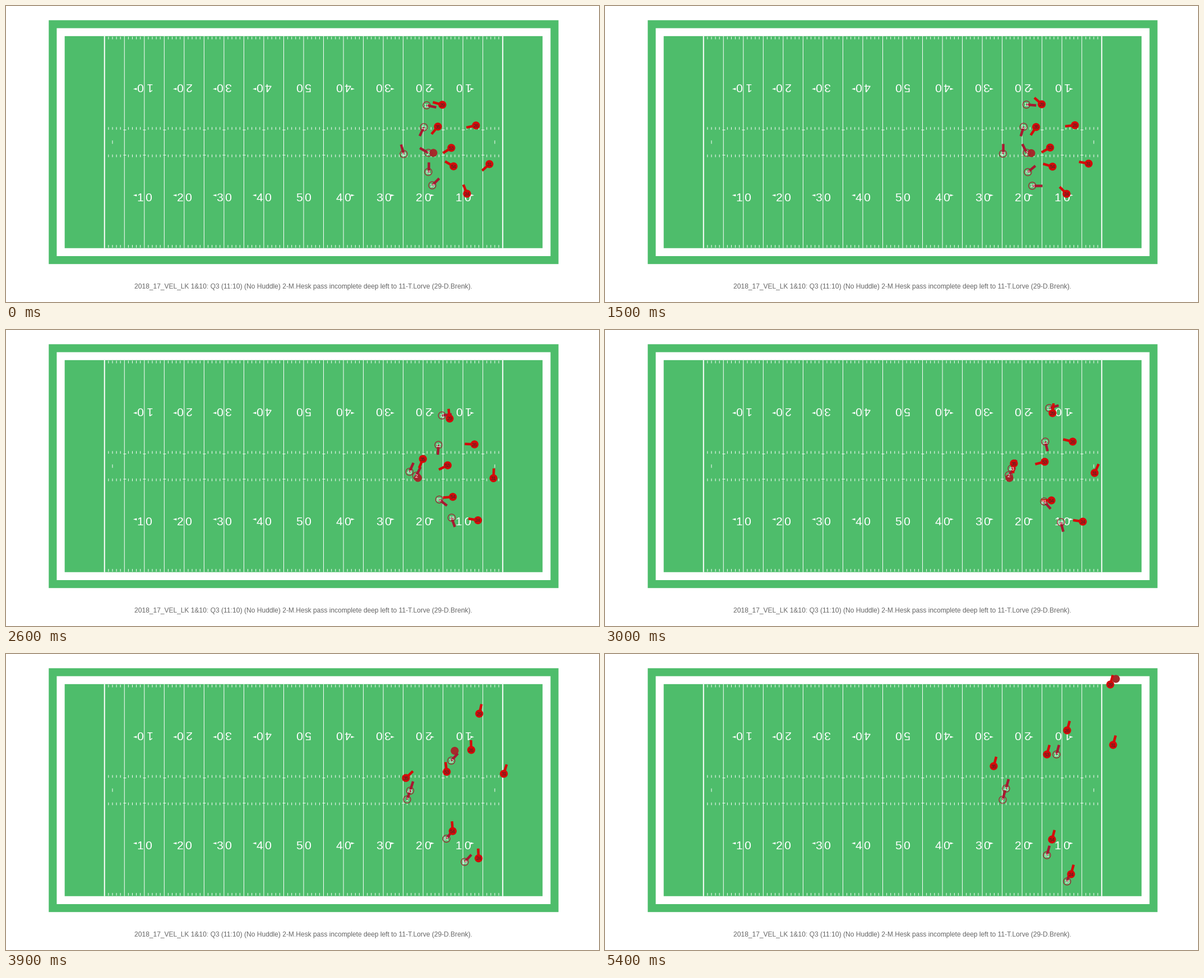
Recreate the animation shown at these times as a matplotlib script. Size 1058 by 529 pixels, loop 5500 ms.

```python
import numpy as np
import matplotlib.pyplot as plt
from matplotlib.animation import FuncAnimation
from matplotlib.patches import Circle, Polygon, Rectangle

W, H = 1058, 529
FRAMES, INTERVAL = 55, 100
SNAP, THROW, TURNED, LAST = 13, 30, 41, FRAMES - 1

YARD = 7.105
CX, CY = 530.5, 242.8
HALF_LENGTH, HALF_WIDTH = 60 * YARD, 26.667 * YARD
LEFT, TOP, BOTTOM = CX - 50 * YARD, CY - HALF_WIDTH, CY + HALF_WIDTH
TICK = 0.66 * YARD

GREEN, WHITE = "#4EBD6B", "#FFFFFF"
OFFENSE, DEFENSE = "#A71930", "#D50A0A"
BALL, INK, CAPTION = "#A52A2A", "#34302B", "#666666"
RADIUS, STICK, UPFIELD = 6.5, 17.5, 75

plt.rcParams["font.family"] = "Liberation Sans"
fig = plt.figure(figsize=(W / 72, H / 72), dpi=72, facecolor=WHITE)
ax = fig.add_axes([0, 0, 1, 1])
# Whole coordinates fall on pixel centres.
ax.set(xlim=(-0.5, W - 0.5), ylim=(H - 0.5, -0.5))
ax.axis("off")


def label(x, y, text, size, color, flip=1, **kw):
    """Text centred on x, with its digits centred on y."""
    return ax.text(x, y + flip * 0.353 * size, text, size=size, color=color,
                   ha="center", va="baseline", rotation=90 - 90 * flip,
                   rotation_mode="anchor", **kw)


def vertical(xs, y0, y1, width=1):
    ax.vlines(xs, y0, y1, color=WHITE, lw=width, zorder=2).set_snap(False)


def draw_number(x, value, side):
    for flip in (1, -1):
        y = CY + flip * 98
        for char, offset in zip(str(value), (-7.5, 7.5)):
            label(x + flip * offset, y, char, 21.3, WHITE, flip, zorder=2)
        if side:
            base, tip, ay = x + side * 13.5, x + side * 20, y - flip * 3
            ax.add_patch(Polygon([(base, ay - 2), (base, ay + 2), (tip, ay)],
                                 color=WHITE, lw=0, zorder=2))


def draw_field():
    for yards, color in ((4, GREEN), (2, WHITE), (0, GREEN)):
        w, h = HALF_LENGTH + yards * YARD, HALF_WIDTH + yards * YARD
        ax.add_patch(Rectangle((CX - w, CY - h), 2 * w, 2 * h, color=color,
                               lw=0, snap=False))

    yards = np.arange(1, 100)
    xs = LEFT + YARD * yards
    fives, singles = xs[yards % 5 == 0], xs[yards % 5 != 0]
    vertical(fives, TOP, BOTTOM)
    vertical([LEFT, LEFT + 100 * YARD], TOP, BOTTOM, 2)
    vertical([LEFT + 2 * YARD, LEFT + 98 * YARD], CY - 3, CY + 3)
    for side in (-1, 1):
        hash_y, edge = CY + side * 22.2, CY + side * (HALF_WIDTH - 1)
        vertical(singles, hash_y, hash_y + side * TICK)
        vertical(singles, edge, edge - side * TICK)
        ax.hlines([hash_y] * len(fives), fives - 2.5, fives + 2.5,
                  color=WHITE, lw=1, zorder=2)

    for mark in range(10, 100, 10):
        draw_number(LEFT + YARD * mark, min(mark, 100 - mark), np.sign(mark - 50))


def progress(t, start, end):
    return np.clip((t - start) / (end - start), 0, 1)


def slowing(u):
    return u * (1.3 - 0.3 * u)


class Player:
    """Runs from set to spot as the passer drops back, then on to finish."""

    def __init__(self, number, attacking, path, stance, dropback, last=LAST):
        self.set, self.spot, self.finish = np.array(path, float)
        self.headings = stance, dropback, UPFIELD
        self.last = last
        color, z = (OFFENSE, 4) if attacking else (DEFENSE, 5)
        self.stick, = ax.plot([], [], color=color, lw=4.5,
                              solid_capstyle="butt", zorder=z)
        self.dot = Circle((0, 0), RADIUS, ec=color, lw=1.2, zorder=z,
                          fc="none" if attacking else color)
        ax.add_patch(self.dot)
        self.text = label(0, 0, str(number), 9, WHITE if attacking else INK, zorder=6)

    def position(self, t):
        run = progress(t, SNAP, THROW) ** 1.6
        chase = slowing(progress(t, THROW, LAST))
        return (self.set + run * (self.spot - self.set)
                + chase * (self.finish - self.spot))

    def update(self, t):
        x, y = self.position(t)
        angle = np.radians(np.interp(t, (8, THROW - 1, TURNED), self.headings))
        self.stick.set_data([x, x + STICK * np.cos(angle)],
                            [y, y - STICK * np.sin(angle)])
        self.dot.center = x, y
        self.text.set_position((x, y + 0.353 * 9))
        for artist in (self.stick, self.dot, self.text):
            artist.set_visible(t <= self.last)


draw_field()
label(530, 500.5, "2018_17_VEL_LK 1&10: Q3 (11:10) (No Huddle) 2-M.Hesk pass "
      "incomplete deep left to 11-T.Lorve (29-D.Brenk).", 12, CAPTION)

passer = Player(2, True, [(753, 262), (720, 259), (709, 260)], 150, 50)
players = [
    passer,
    Player(11, True, [(750, 177), (792, 139), (850, 95)], -12, 10, last=33),
    Player(12, True, [(745, 216), (785, 199), (805, 179)], -115, -90),
    Player(43, True, [(709, 264), (725, 247), (715, 240)], 105, 60),
    Player(81, True, [(753, 296), (783, 306), (788, 359)], 90, -60),
    Player(18, True, [(760, 320), (813, 343), (824, 406)], 45, -90),
    Player(29, False, [(778, 176), (798, 148), (901, 54)], 165, 85),
    Player(35, False, [(770, 215), (729, 238), (693, 200)], -130, -110),
    Player(26, False, [(838, 213), (834, 199), (824, 136)], 192, 175),
    Player(53, False, [(794, 253), (784, 235), (788, 179)], 212, 205),
    Player(54, False, [(798, 286), (796, 304), (797, 331)], 150, 190),
    Player(31, False, [(862, 282), (873, 255), (906, 162)], 222, 65),
    Player(24, False, [(822, 335), (852, 342), (831, 393)], 112, 180),
]

ball = Circle((0, 0), 7.1, color=BALL, lw=0, zorder=3.5)
ax.add_patch(ball)
SNAP_REACH, THROW_REACH = np.array([9, 0]), np.array([1, 5])
LANDING = np.array([911, 44])


def ball_position(t):
    """Held by the passer, then thrown in a straight, slowing line."""
    drop = progress(t, SNAP, THROW)
    held = passer.position(min(t, THROW)) + SNAP_REACH + drop * (THROW_REACH - SNAP_REACH)
    return held + slowing(progress(t, THROW + 1, LAST)) * (LANDING - held)


def update(t):
    for player in players:
        player.update(t)
    ball.center = ball_position(t)
    return []


anim = FuncAnimation(fig, update, frames=FRAMES, interval=INTERVAL,
                     repeat=True, repeat_delay=0)
plt.show()
```
